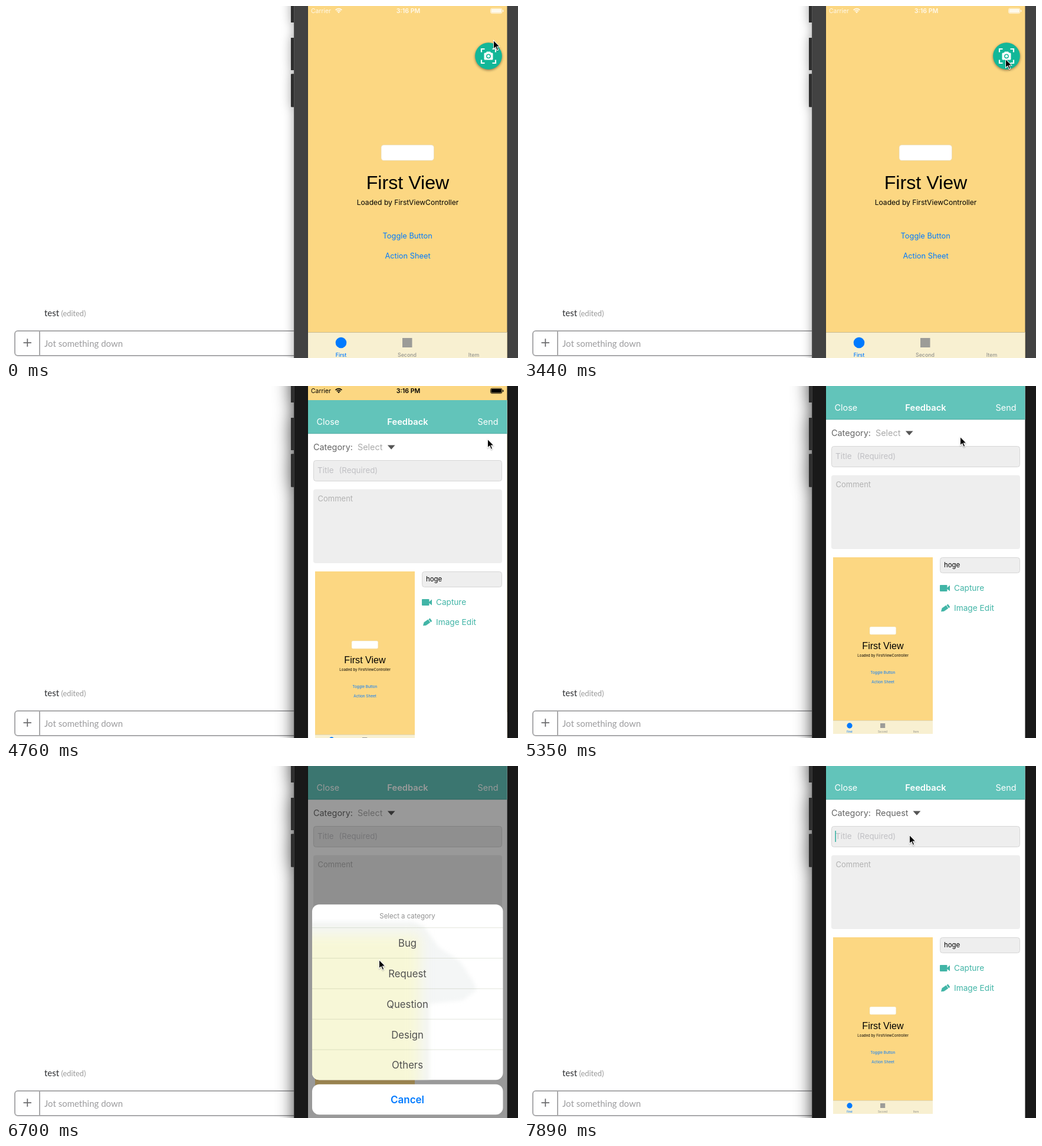
Write an HTML page with a canvas that moves like this. It is 868 by 598 pixels and loops after 8 s.

```html
<!DOCTYPE html>
<html lang="en">
<head>
<meta charset="utf-8">
<title>Feedback form</title>
<style>
html, body { margin: 0; width: 100%; height: 100%; overflow: hidden; background: #fff; }
canvas { display: block; }
</style>
</head>
<body>
<canvas id="stage" width="868" height="598"></canvas>
<script>
const W = 868, H = 598, LOOP = 8000;
const ctx = document.getElementById('stage').getContext('2d');
const UI = 'Inter, "Liberation Sans", sans-serif';
const NOTE = 'Lato, sans-serif';
const YELLOW = '#fcd782', BLUE = '#007aff', TEAL = '#62c4ba', LINK = '#42b5a7';
const LEFT = 512, RIGHT = 849.5, MID = 681;

const TICK = 149, FOCUS = 4160;
const FORM_IN = 4460, SHEET_IN = 5813, SHEET_OUT = 7020, CARET = 7885;

const clamp = v => Math.max(0, Math.min(1, v));
const smooth = v => v * v * (3 - 2 * v);

// Remaining distance (1 to 0) of a critically damped spring
function spring(ms) {
  const x = Math.max(0, ms) * 0.017;
  return (1 + x) * Math.exp(-x);
}

function text(str, x, y, size, color, align = 'left', weight = 400, family = UI) {
  ctx.font = `${weight} ${size}px ${family}`;
  ctx.textAlign = align;
  ctx.fillStyle = color;
  ctx.fillText(str, x, y);
}

function rect(x, y, w, h, color) {
  ctx.fillStyle = color;
  ctx.fillRect(x, y, w, h);
}

function round(x, y, w, h, r, fill, stroke, line = 1) {
  ctx.beginPath();
  ctx.roundRect(x, y, w, h, r);
  if (fill) { ctx.fillStyle = fill; ctx.fill(); }
  if (stroke) { ctx.strokeStyle = stroke; ctx.lineWidth = line; ctx.stroke(); }
}

function poly(points, fill) {
  ctx.beginPath();
  points.forEach(([x, y]) => ctx.lineTo(x, y));
  ctx.closePath();
  ctx.fillStyle = fill;
  ctx.fill();
}

function disc(x, y, r, fill) {
  ctx.beginPath();
  ctx.arc(x, y, r, 0, Math.PI * 2);
  ctx.fillStyle = fill;
  ctx.fill();
}

function group(draw) {
  ctx.save();
  draw();
  ctx.restore();
}

function notes() {
  rect(0, 0, W, H, '#fff');
  text('test', 65, 527, 15, '#2c2d30', 'left', 400, NOTE);
  text('(edited)', 93.5, 527, 12.8, '#9a9a9a', 'left', 400, NOTE);
  round(15, 552, 520, 42, 5, null, '#a9a9ab', 2);
  rect(56, 552, 2, 42, '#a9a9ab');
  rect(29.5, 571.2, 13.5, 1.8, '#6e6e70');
  rect(35.4, 565.2, 1.8, 13.6, '#6e6e70');
  text('Jot something down', 65, 579, 15, '#9c9c9e', 'left', 400, NOTE);
}

function phoneBody(active) {
  const buttons = [[-20, 48], [54, 55], [115.5, 56]];
  group(() => {
    ctx.shadowColor = `rgba(0,0,0,${active ? 0.75 : 0.36})`;
    ctx.shadowBlur = active ? 29 : 17;
    ctx.fillStyle = '#303030';
    ctx.beginPath();
    ctx.rect(488, -300, 700, 1200);
    buttons.forEach(([y, h]) => ctx.rect(483, y, 5, h));
    ctx.fill();
  });
  buttons.forEach(([y, h]) => round(483, y, 8, h, 2.5, '#2e2e2e'));
  rect(488, 0, W - 488, H, active ? '#191919' : '#424242');
  rect(488, 0, 1, H, active ? '#3c3c3c' : '#555');
  rect(511, 0, 1, H, active ? '#111' : '#383838');
}

function statusBar(color) {
  text('Carrier', 517, 12, 10.4, color);
  text('3:16 PM', 682, 12, 10.6, color, 'center', 600);
  ctx.strokeStyle = color;
  ctx.lineWidth = 1.8;
  for (const r of [4.4, 7.4]) {
    ctx.beginPath();
    ctx.arc(564, 12, r, -Math.PI * 0.76, -Math.PI * 0.24);
    ctx.stroke();
  }
  poly([[564, 12.3], [562, 10.1], [564, 9.2], [566, 10.1]], color);
  round(821.5, 4, 19.5, 8.6, 2.4, null, color, 0.8);
  round(822.5, 5, 17.5, 6.6, 1.4, color);
  round(842, 6.6, 1.3, 3.4, 0.6, color);
}

function firstView() {
  rect(LEFT, 0, 338, 601, YELLOW);
  round(636, 236, 89.5, 26.5, 4.5, '#fff', '#e6d6ae', 0.7);
  text('First View', MID, 311, 32.2, '#000', 'center', 400, '"Liberation Sans", Arial, sans-serif');
  text('Loaded by FirstViewController', MID, 337.5, 12.1, '#000', 'center');
  text('Toggle Button', 680.7, 395, 12.8, BLUE, 'center');
  text('Action Sheet', 681, 428.5, 12.8, BLUE, 'center');
  rect(LEFT, 554, 338, 47, '#f8f0d1');
  rect(LEFT, 554, 338, 0.9, '#c3b78f');
  disc(568, 572, 9.3, BLUE);
  rect(672, 564, 16.5, 16, '#9c9c98');
  text('First', 568, 596, 8.8, BLUE, 'center', 500);
  text('Second', 680, 596, 8.8, '#96968f', 'center', 500);
  text('Item', 793, 596, 8.8, '#96968f', 'center', 500);
}

function captureButton() {
  group(() => {
    ctx.shadowColor = 'rgba(0,0,0,.45)';
    ctx.shadowBlur = 4;
    ctx.shadowOffsetY = 1.5;
    disc(818, 85, 22.8, '#12b798');
  });
  ctx.strokeStyle = '#fff';
  ctx.lineWidth = 2.2;
  for (const sx of [-1, 1]) for (const sy of [-1, 1]) {
    ctx.beginPath();
    ctx.moveTo(818 + sx * 12, 85 + sy * 6.5);
    ctx.lineTo(818 + sx * 12, 85 + sy * 12);
    ctx.lineTo(818 + sx * 6.5, 85 + sy * 12);
    ctx.stroke();
  }
  round(810.5, 79.5, 15, 12, 1.5, '#fff');
  poly([[813.5, 80], [815, 77.5], [821, 77.5], [822.5, 80]], '#fff');
  disc(818, 85.3, 3.9, '#12b798');
  disc(818, 85.3, 2.4, '#fff');
}

function form(category, caret) {
  rect(LEFT, 0, 338, 640, '#fff');
  rect(LEFT, 0, 338, 57, TEAL);
  rect(LEFT, 56.4, 338, 0.8, '#4fa79d');
  text('Close', 526.5, 42.2, 14.4, '#fff');
  text('Feedback', MID, 42.2, 14.7, '#fff', 'center', 600);
  text('Send', 834.5, 42.2, 14.4, '#fff', 'right');

  text('Category:', 521, 84.8, 14.4, '#666');
  text(category || 'Select', 596, 84.8, 14.4, category ? '#666' : '#aaa');
  const ax = category ? 659.5 : 646.8;
  poly([[ax, 76.5], [ax + 12.8, 76.5], [ax + 6.4, 83.8]], '#555');

  round(521.5, 102.5, 319, 35, 4, '#eee', '#d6d6d6');
  text('Title', 528, 124.3, 13.5, '#c0c0c4');
  text('(Required)', 564.5, 124.3, 13.3, '#c0c0c4');
  if (caret) rect(527.3, 110, 1.7, 19, LINK);
  round(521, 151.5, 320, 125.5, 4, '#eee');
  text('Comment', 528.5, 172, 13, '#b2b2b2');

  group(() => {
    ctx.beginPath();
    ctx.rect(524, 291, 169, 300);
    ctx.clip();
    ctx.translate(524, 291);
    ctx.scale(0.5, 0.5);
    ctx.translate(-LEFT, 0);
    firstView();
  });

  round(705.5, 291.5, 135, 26, 4, '#eee', '#d6d6d6');
  text('hoge', 712, 308.3, 11.4, '#000');
  round(705, 338, 12.5, 11, 1, LINK);
  poly([[717, 343], [722, 338.5], [722, 348.5], [717, 344.5]], LINK);
  text('Capture', 729, 348.2, 13.6, LINK);
  group(() => {
    ctx.translate(714, 377.5);
    ctx.rotate(-0.6);
    poly([[-9, 0.8], [-4.5, -3.2], [4.2, -3.2], [4.2, 3.2], [-4.5, 3.2]], LINK);
    round(5, -3.2, 3, 6.4, 1, LINK);
  });
  text('Image Edit', 729, 382.3, 13.7, LINK);
}

function tint(shown) {
  // Blurred page colours seen through the sheet
  ctx.globalAlpha = shown;
  ctx.filter = 'blur(3px)';
  poly([[500, 264], [690, 264], [708, 272], [734, 308], [770, 332], [792, 366],
    [798, 380], [775, 398], [718, 404], [718, 620], [500, 620]], '#f4f6f6');
  ctx.filter = 'blur(11px)';
  ctx.globalAlpha = shown * shown;
  rect(470, 286, 232, 400, '#f7f7d7');
  ctx.filter = 'none';
  ctx.globalAlpha = 1;
}

function panel(y, h, shown) {
  ctx.beginPath();
  ctx.roundRect(519, y, 323.5, h, 12);
  ctx.fillStyle = '#fff';
  ctx.fill();
  ctx.clip();
  if (shown !== undefined) tint(shown);
}

function sheet(hidden, picked) {
  const top = 235.3 + 363 * hidden;
  rect(LEFT, 0, 338, H, `rgba(0,0,0,${0.4 * (1 - hidden)})`);
  group(() => {
    panel(top, 298, 1 - hidden);
    text('Select a category', 680.5, top + 24, 11.4, '#909090', 'center');
    ['Bug', 'Request', 'Question', 'Design', 'Others'].forEach((name, i) => {
      const y = top + 39 + i * 51.8;
      if (picked && i === 1) rect(519, y, 324, 51.8, 'rgba(0,0,0,.08)');
      rect(519, y, 324, 0.9, 'rgba(130,145,110,.25)');
      text(name, 680.5, y + 32.8, 16.7, '#505050', 'center');
    });
  });
  group(() => {
    panel(top + 305.5, 51.5);
    text('Cancel', 680.5, top + 337.3, 17, BLUE, 'center', 600);
  });
}

function pointerAt(t) {
  const jumps = [[0, 826, 58], [150, 822, 76], [300, 818, 90], [1490, 817, 90], [3440, 816, 90]];
  if (t < FOCUS) return jumps.filter(k => k[0] <= t).pop().slice(1);
  const glides = [[4800, 5650, 648, 81], [6110, 6693, 632, 329], [6693, 6900, 636, 350], [7100, 7580, 653, 117]];
  let x = 816, y = 90;
  for (const [from, to, gx, gy] of glides) {
    const p = smooth(clamp((t - from) / (to - from)));
    x += (gx - x) * p;
    y += (gy - y) * p;
  }
  return [Math.round(x), Math.round(y)];
}

function pointer(x, y) {
  group(() => {
    ctx.translate(x, y);
    ctx.shadowColor = 'rgba(0,0,0,.3)';
    ctx.shadowBlur = 2;
    ctx.shadowOffsetY = 1;
    poly([[0, -1], [0, 16.2], [3.8, 12.8], [6.2, 18.3], [9.4, 17], [7, 11.6], [12, 11.4]], '#fff');
    ctx.shadowColor = 'transparent';
    poly([[1, 1.4], [1, 13.8], [4.1, 11], [6.7, 16.8], [8.1, 16.2], [5.6, 10.6], [9.8, 10.5]], '#000');
  });
}

function render(time) {
  const t = time < FOCUS ? time : FOCUS + TICK * Math.floor((time - FOCUS) / TICK);
  notes();
  phoneBody(t >= FOCUS);
  group(() => {
    ctx.beginPath();
    ctx.rect(LEFT, 0, RIGHT - LEFT, H);
    ctx.clip();
    const presented = t > FORM_IN;
    const formY = Math.round(H * spring(t - FORM_IN));
    if (formY > 0) {
      firstView();
      statusBar(presented ? '#000' : 'rgba(255,255,255,.85)');
      if (!presented) captureButton();
    }
    if (presented) group(() => {
      ctx.translate(0, formY);
      form(t > SHEET_OUT ? 'Request' : '', t >= CARET);
    });
    const hidden = t < SHEET_OUT ? spring(t - SHEET_IN) : 1 - spring(t - SHEET_OUT);
    if (t > SHEET_IN && hidden < 0.97) sheet(hidden, t > 6950);
  });
  pointer(...pointerAt(t));
}

let start;
function frame(now) {
  start ??= now;
  render((now - start) % LOOP);
  requestAnimationFrame(frame);
}
requestAnimationFrame(frame);
</script>
</body>
</html>
```
